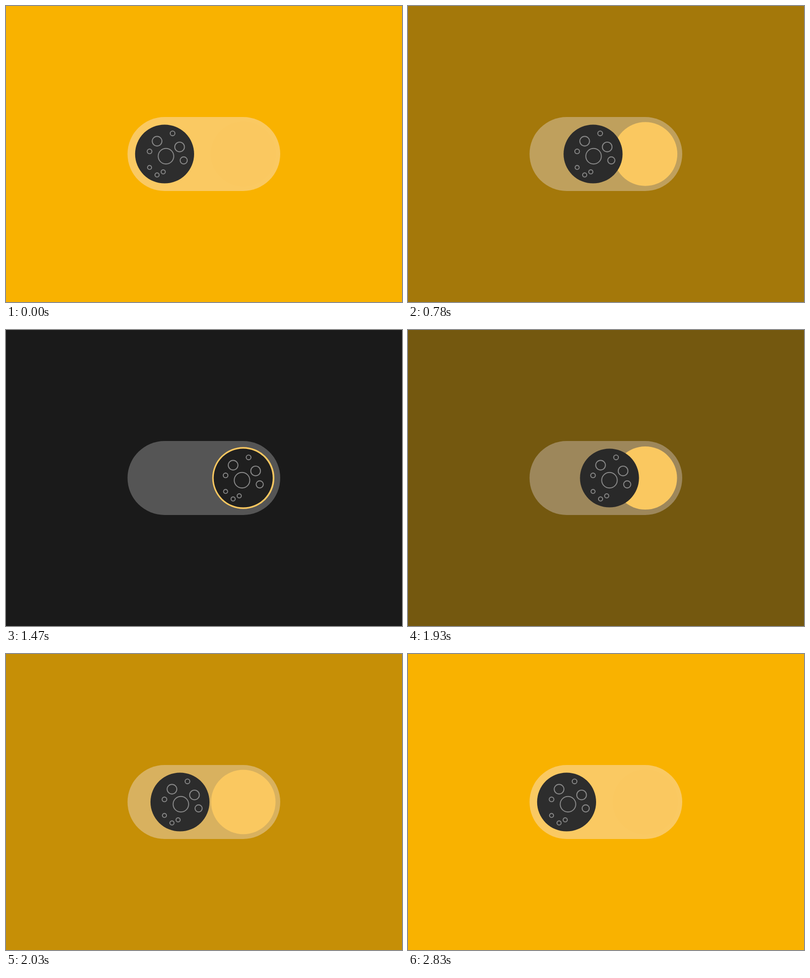
These frames come from a looping animation (800 px wide and 600 px high, 2850 ms). An HTML page:

```html
<!DOCTYPE html>
<html lang="en">
<head>
<meta charset="utf-8">
<title>Day and night switch</title>
<style>
  html, body { margin: 0; width: 100%; height: 100%; overflow: hidden; background: #f9b200; }
  svg { display: block; width: 100vw; height: 100vh; }
</style>
</head>
<body>
<svg viewBox="0 0 800 600">
  <rect id="sky" width="800" height="600"/>
  <rect id="track" x="245.5" y="225" width="308.5" height="150" rx="75"/>
  <circle id="sun" cx="479.4" cy="300" fill="#fac860"/>
  <circle id="moon" cy="300" r="59.6"/>
  <g id="craters" fill="none" stroke="#898989" stroke-width="1.9"></g>
</svg>
<script>
const LOOP = 2850;
const SHIFT = 530;
const MOVES = [
  { start: 550, from: 0, to: 1, ease: [0.54, 0.51] },
  { start: 1720, from: 1, to: 0, ease: [0.46, 0.32] }
];
const COLORS = {
  sky: [[249, 178, 0], [26, 26, 26]],
  track: [[250, 201, 98], [85, 85, 85]],
  moon: [[45, 45, 45], [31, 31, 31]]
};
// x, y, radius
const CRATERS = [
  [323.2, 304.5, 15.7], [305.2, 274, 9.8], [350.7, 285.7, 9.8],
  [336.5, 258.2, 4.8], [290, 294.7, 4.7], [359, 313, 7.2],
  [290, 327.3, 4.1], [305.2, 342.4, 4.2], [317.6, 336.2, 4.2]
];

const el = id => document.getElementById(id);
const [sky, track, sun, moon, craters] = ['sky', 'track', 'sun', 'moon', 'craters'].map(el);

for (const [cx, cy, r] of CRATERS) {
  const ring = document.createElementNS('http://www.w3.org/2000/svg', 'circle');
  Object.entries({ cx, cy, r }).forEach(([k, v]) => ring.setAttribute(k, v));
  craters.append(ring);
}

const lerp = (a, b, k) => a + (b - a) * k;
const mix = ([a, b], k) => `rgb(${a.map((v, i) => Math.round(lerp(v, b[i], k)))})`;
// Pushes the middle of a 0..1 ramp up without moving its ends
const lead = (p, k) => p + k * p * (1 - p);

// cubic-bezier(a, 0, b, 1), solved by bisection
function bezier(x, [a, b]) {
  if (x <= 0) return 0;
  if (x >= 1) return 1;
  let lo = 0, hi = 1, u;
  for (let i = 0; i < 24; i++) {
    u = (lo + hi) / 2;
    const v = 1 - u;
    if (3 * a * u * v * v + 3 * b * u * u * v + u * u * u < x) lo = u;
    else hi = u;
  }
  return u * u * (3 - 2 * u);
}

function progress(t) {
  let p = 0;
  for (const m of MOVES) {
    if (t >= m.start) p = lerp(m.from, m.to, bezier((t - m.start) / SHIFT, m.ease));
  }
  return p;
}

function draw(t) {
  const p = progress(t);
  sky.setAttribute('fill', mix(COLORS.sky, lead(p, 0.2)));
  track.setAttribute('fill', mix(COLORS.track, lead(p, 0.08)));
  moon.setAttribute('fill', mix(COLORS.moon, p * p));
  moon.setAttribute('cx', lerp(320.4, 479.2, p));
  sun.setAttribute('r', lerp(65.7, 62.8, p));
  craters.setAttribute('transform', `translate(${153.6 * p} 0)`);
}

const begin = performance.now();
function tick(now) {
  draw(Math.max(0, now - begin) % LOOP);
  requestAnimationFrame(tick);
}
draw(0);
requestAnimationFrame(tick);
</script>
</body>
</html>
```
